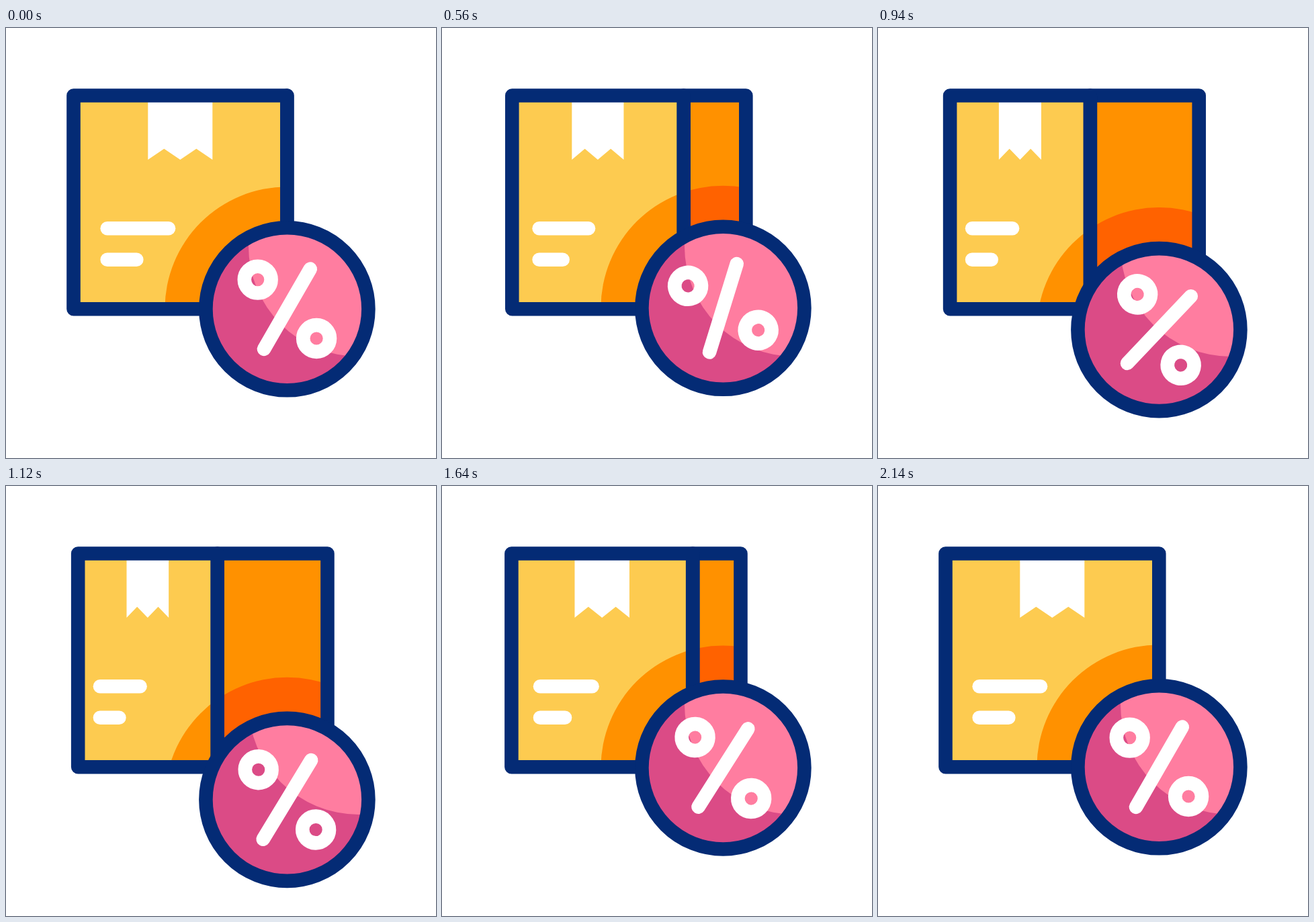
Recreate the animation shown at these times as an HTML page with a canvas. Size 640 px wide and 640 px high, loop 2400 ms.

```html
<!DOCTYPE html>
<html lang="en">
<head>
<meta charset="utf-8">
<title>Parcel discount</title>
<style>
html, body { margin: 0; width: 100%; height: 100%; overflow: hidden; background: #fff; }
canvas { display: block; width: 100vw; height: 100vh; }
</style>
</head>
<body>
<canvas id="stage" width="640" height="640"></canvas>
<script>
const ctx = document.getElementById('stage').getContext('2d');
const LOOP = 2400, HALF = 1080, STEP = 20;
const NAVY = '#042b75', YELLOW = '#fdcb50', ORANGE = '#ff9100', DEEP = '#ff6200';
const PINK = '#ff7da0', PLUM = '#db4b86', WHITE = '#fff';
const TOP = 100.5, BOTTOM = 418.3, COIN_X = 418.4;

// [time, value] keys joined by sine easing
const BOB = [[0, 418.3], [350, 472.1], [715, 382.5], [1055, 472.1], [1440, 396], [1790, 434.5], [2140, 418.3]];
const SWING = [[0, 0], [440, -18.5], [880, 14.6], [1310, -8], [1730, 3.7], [2140, 0]];

const mix = (a, b, k) => a + (b - a) * k;

function keyed(keys, t) {
  const i = keys.findIndex(key => key[0] > t);
  if (i < 0) return keys[keys.length - 1][1];
  const [t0, a] = keys[i - 1], [t1, b] = keys[i];
  return mix(a, b, (1 - Math.cos(Math.PI * (t - t0) / (t1 - t0))) / 2);
}

// cubic-bezier(.72, 0, .28, 1)
function ease(x) {
  let lo = 0, hi = 1, s = 0.5;
  for (let i = 0; i < 24; i++) {
    s = (lo + hi) / 2;
    const r = 1 - s;
    if (2.16 * s * r * r + 0.84 * s * s * r + s ** 3 < x) lo = s; else hi = s;
  }
  return s * s * (3 - 2 * s);
}

function disc(x, y, r, fill) {
  ctx.beginPath();
  ctx.arc(x, y, r, 0, 2 * Math.PI);
  if (fill) {
    ctx.fillStyle = fill;
    ctx.fill();
  }
}

function line(x1, y1, x2, y2) {
  ctx.beginPath();
  ctx.moveTo(x1, y1);
  ctx.lineTo(x2, y2);
  ctx.strokeStyle = WHITE;
  ctx.stroke();
}

// Outlined panel with the coin's shadow and optional decoration inside
function panel(x1, x2, fill, shadow, coinY, decorate) {
  const path = new Path2D();
  path.rect(x1, TOP, x2 - x1, BOTTOM - TOP);
  ctx.save();
  ctx.clip(path);
  ctx.fillStyle = fill;
  ctx.fill(path);
  disc(COIN_X, coinY, 182, shadow);
  if (decorate) decorate();
  ctx.restore();
  ctx.strokeStyle = NAVY;
  ctx.stroke(path);
}

function box(open, coinY) {
  const left = mix(100.5, 107.2, open);
  const edge = mix(418.3, 314.5, open);
  const right = mix(418.3, 478.5, open);
  const px = x => left + (x - 100.5) * (edge - left) / 317.8;

  if (open > 0) panel(edge, right, ORANGE, DEEP, coinY);
  panel(left, edge, YELLOW, ORANGE, coinY, () => {
    ctx.beginPath();
    ctx.moveTo(px(211.3), TOP);
    [196, 179.7, 196, 179.7, 196].forEach((y, i) => ctx.lineTo(px(211.3 + 24 * i), y));
    ctx.lineTo(px(307.3), TOP);
    ctx.fillStyle = WHITE;
    ctx.fill();
    line(px(150.7), 298.2, px(242), 298.2);
    line(px(150.7), 344.7, px(194.3), 344.7);
  });
}

function coin(y, degrees) {
  ctx.save();
  disc(COIN_X, y, 121, PLUM);
  ctx.clip();
  disc(525, 325, 164, PINK);
  ctx.restore();

  disc(COIN_X, y, 121);
  ctx.strokeStyle = NAVY;
  ctx.stroke();

  ctx.save();
  ctx.translate(COIN_X, y);
  ctx.rotate(degrees * Math.PI / 180);
  line(34.4, -59.6, -34.4, 59.6);
  for (const d of [-43.7, 43.7]) {
    disc(d, d, 19.9);
    ctx.stroke();
  }
  ctx.restore();
}

function draw(now) {
  const t = Math.floor(now % LOOP / STEP) * STEP;
  const open = t < 2140 ? ease(1 - Math.abs(t - HALF) / HALF) : 0;
  const coinY = keyed(BOB, t);
  ctx.fillStyle = WHITE;
  ctx.fillRect(0, 0, 640, 640);
  ctx.lineWidth = 20.6;
  ctx.lineCap = ctx.lineJoin = 'round';
  box(open, coinY);
  coin(coinY, keyed(SWING, t));
}

const start = performance.now();
function tick() {
  draw(performance.now() - start);
  requestAnimationFrame(tick);
}
tick();
</script>
</body>
</html>
```
